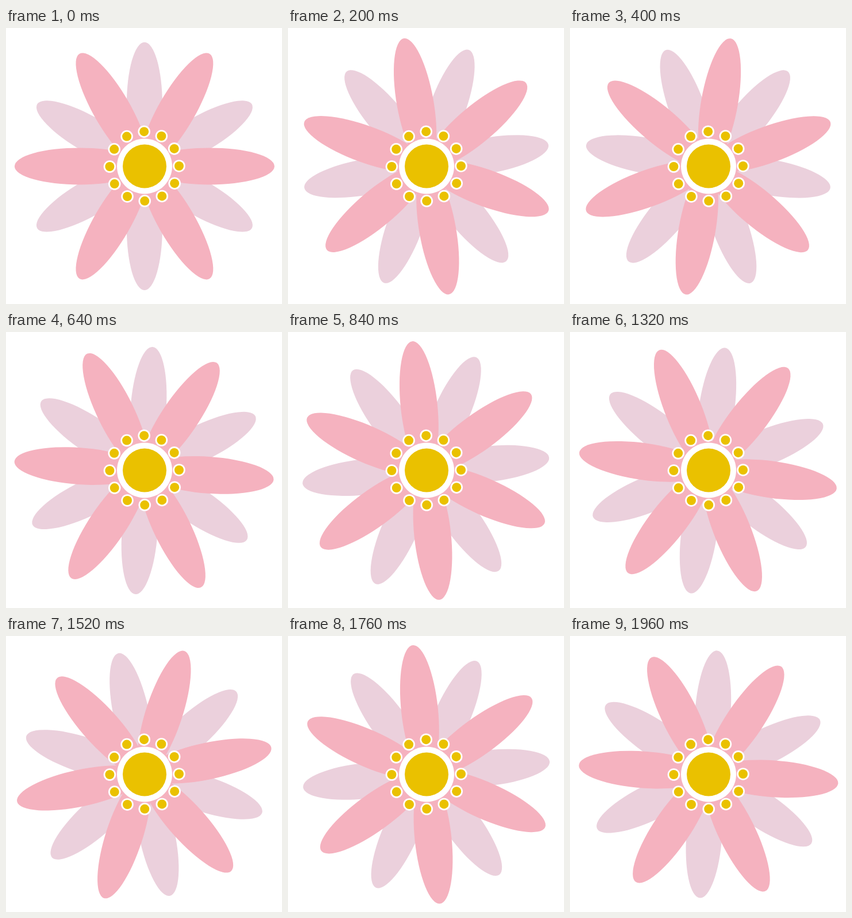
Recreate the animation shown at these times as an HTML page. Size 480 by 480 pixels, loop 2000 ms.

```html
<!DOCTYPE html>
<html lang="en">
<head>
<meta charset="utf-8">
<title>Swaying flower</title>
<style>
  html, body { margin: 0; width: 100%; height: 100%; overflow: hidden; background: #fff; }
  svg { display: block; width: 100vw; height: 100vh; }
</style>
</head>
<body>
<svg viewBox="0 0 480 480">
  <g id="petals"></g>
  <g id="heart"></g>
</svg>
<script>
const LOOP = 2000, STEP = 40, SWING = 100;
const PINK = '#f5b2bf', PALE = '#ebd0dc', GOLD = '#eac100', WHITE = '#fff';
const petals = document.getElementById('petals');
const heart = document.getElementById('heart');

function add(parent, tag, attrs) {
  const node = document.createElementNS('http://www.w3.org/2000/svg', tag);
  for (const key in attrs) node.setAttribute(key, attrs[key]);
  parent.appendChild(node);
}

// Six ellipses that all start at the flower's middle.
function addPetals(start, rx, ry, fill) {
  for (let i = 0; i < 6; i++) {
    add(petals, 'ellipse', { cx: rx, rx, ry, fill,
      transform: `translate(240.9 240.4) rotate(${start + i * 60})` });
  }
}

function addDisc(cx, cy, outer, inner) {
  add(heart, 'circle', { cx, cy, r: outer, fill: WHITE });
  add(heart, 'circle', { cx, cy, r: inner, fill: GOLD });
}

addPetals(30, 107.8, 31, PALE);
addPetals(0, 113, 32, PINK);

addDisc(241, 240.5, 48, 38);
for (let i = 0; i < 12; i++) {
  const angle = (i * 30 - 0.5) * Math.PI / 180;
  addDisc(240.7 + 60.3 * Math.cos(angle), 240.5 + 60.3 * Math.sin(angle), 10.8, 8);
}

// Linear swing there and back, in 25 steps per second.
function draw(time) {
  const t = Math.floor((time % LOOP) / STEP) * STEP / LOOP;
  const angle = SWING * (1 - Math.abs(1 - 2 * t));
  petals.setAttribute('transform', `rotate(${angle} 240 240)`);
}

const begin = performance.now();
function tick() {
  draw(performance.now() - begin);
  requestAnimationFrame(tick);
}
tick();
</script>
</body>
</html>
```
